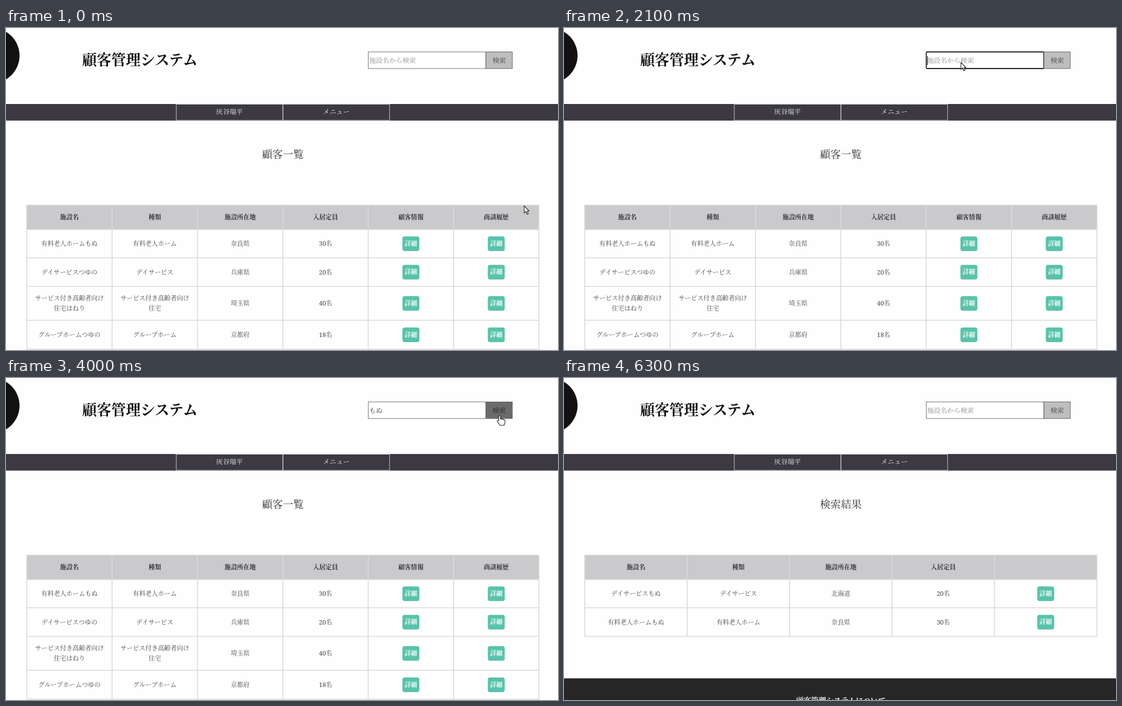
An HTML page for the animation above (6700 ms loop, 979 by 572 pixels).

```html
<!DOCTYPE html>
<html lang="ja">
<head>
<meta charset="utf-8">
<title>顧客管理システム</title>
<style>
  html, body { margin: 0; width: 100%; height: 100%; overflow: hidden; background: #fefefe; }
  svg { display: block; }
  text { font-family: "Noto Serif", "Noto Serif CJK JP", "Noto Serif JP", "Noto Sans CJK JP", serif; }
  .ui { font-family: "Noto Sans CJK JP", "Noto Sans", sans-serif; font-feature-settings: "palt"; }
</style>
</head>
<body>
<svg id="stage" width="979" height="572" viewBox="0 0 979 572"></svg>
<script>
const LOOP = 6700, STEP = 100;
const stage = document.getElementById('stage');
const INK = '#444', LINE = '#dadadc', GREEN = '#58c3aa';

function add(parent, tag, attrs = {}, content) {
  const el = document.createElementNS('http://www.w3.org/2000/svg', tag);
  for (const key in attrs) el.setAttribute(key, attrs[key]);
  if (content !== undefined) el.textContent = content;
  parent.append(el);
  return el;
}
const group = (parent = stage) => add(parent, 'g');
const box = (parent, x, y, width, height, fill, more) =>
  add(parent, 'rect', { x, y, width, height, fill, ...more });
const path = (parent, d, fill, more) => add(parent, 'path', { d, fill, ...more });

// Text placed by the vertical centre of its ideographs.
function label(parent, content, x, cy, size, fill = INK, more = {}) {
  return add(parent, 'text', {
    x, y: cy + size * 0.38, 'font-size': size, fill, 'text-anchor': 'middle', ...more
  }, content);
}
const left = { 'text-anchor': 'start' };
const bold = { 'font-weight': 600 };

function table(parent, ys, heads, rows) {
  const x0 = 36.8, x1 = 945.2, width = (x1 - x0) / heads.length;
  const bottom = ys[ys.length - 1];
  const mid = i => x0 + width * (i + 0.5);
  box(parent, x0, ys[0], x1 - x0, ys[1] - ys[0], '#cacacc');
  let grid = ys.map(y => `M${x0} ${y}H${x1}`).join('');
  for (let i = 0; i <= heads.length; i++) grid += `M${x0 + width * i} ${ys[0]}V${bottom}`;
  path(parent, grid, 'none', { stroke: LINE, 'stroke-width': 1.6, 'stroke-linecap': 'square' });
  heads.forEach((h, i) => label(parent, h, mid(i), 336, 11.1, '#2c2c2e', bold));
  rows.forEach((row, r) => {
    const cy = (ys[r + 1] + ys[r + 2]) / 2;
    row.forEach((cell, i) => {
      if (cell === DETAIL) {
        box(parent, mid(i) - 15, cy - 13, 30, 26, GREEN, { rx: 4 });
        label(parent, cell, mid(i), cy - 0.5, 11.1, '#fff', bold);
        return;
      }
      const lines = cell.split('|');
      lines.forEach((s, n) =>
        label(parent, s, mid(i), cy - 0.3 + (n - (lines.length - 1) / 2) * 17.5, 11.1));
    });
  });
}

// Page frame
const DETAIL = '詳細', WORD = 'もぬ';
add(stage, 'circle', { cx: -25, cy: 49, r: 49, fill: '#111' });
label(stage, '顧客管理システム', 135, 56, 25.9, '#111', { ...left, ...bold });
box(stage, 0, 135, 979, 29.5, '#3c3943');
[['灰谷瑞平', 302], ['メニュー', 491.3]].forEach(([s, x]) => {
  box(stage, x, 135.5, 189, 28.5, 'none', { stroke: '#c4c3c8' });
  label(stage, s, x + 94.5, 148.5, 11.86, '#f6f6f6');
});

// Customer list
const listPage = group();
label(listPage, '顧客一覧', 491, 224, 18.5, '#333');
table(listPage, [314.7, 358, 408.3, 459, 519.3, 570.6, 640],
  ['施設名', '種類', '施設所在地', '入居定員', '顧客情報', '商談履歴'],
  [
    ['有料老人ホーム' + WORD, '有料老人ホーム', '奈良県', '30名'],
    ['デイサービスつゆの', 'デイサービス', '兵庫県', '20名'],
    ['サービス付き高齢者向け|住宅はねり', 'サービス付き高齢者向け|住宅', '埼玉県', '40名'],
    ['グループホームつゆの', 'グループホーム', '京都府', '18名']
  ].map(row => [...row, DETAIL, DETAIL]));

// Search result
const resultPage = group();
label(resultPage, '検索結果', 491, 224, 18.5, '#333');
table(resultPage, [314.7, 358, 408.3, 459],
  ['施設名', '種類', '施設所在地', '入居定員', ''],
  [
    ['デイサービス' + WORD, 'デイサービス', '北海道', '20名', DETAIL],
    ['有料老人ホーム' + WORD, '有料老人ホーム', '奈良県', '30名', DETAIL]
  ]);
box(resultPage, 0, 533.5, 979, 40, '#262626');
label(resultPage, '顧客管理システムについて', 491, 573, 13.4, '#fff', bold);

// Search field
const field = box(stage, 642.5, 42.5, 208.5, 29.5, '#fff');
const hint = label(stage, '施設名から検索', 644, 57, 11.86, '#8c8c8c', left);
const typed = label(stage, '', 644, 57, 11.86, INK, left);
const underline = box(stage, 645, 65, 10, 1, '#777');
const caret = box(stage, 655, 50, 1, 16, '#222');
const button = box(stage, 851.2, 42.5, 46.8, 29.5, '#bebebe', { stroke: '#666' });
const buttonText = label(stage, '検索', 874.8, 57, 11.86, '#444');

// Suggestion balloon
const balloon = group();
balloon.style.filter = 'drop-shadow(0 1px 2px #0006)';
box(balloon, 717, 79, 116.5, 32.5, '#14191b', { rx: 4 });
path(balloon, 'M727 79.5L733 74L739 79.5Z', '#14191b');
label(balloon, WORD, 726, 95.5, 9, '#eee', { ...left, class: 'ui' });

// Input candidates
function candidates(words) {
  const g = group(), h = 25 + words.length * 24, end = 66.5 + h;
  g.style.filter = 'drop-shadow(0 2px 3px #0007)';
  box(g, 627, 66.5, 171, h, '#2c2c2e', { rx: 5 });
  box(g, 627, end - 22, 171, 1, '#252527');
  words.forEach((w, i) => {
    const y = 81.5 + i * 24;
    label(g, i + 1, 642, y, 10, '#909092', { class: 'ui' });
    label(g, w, 651, y, 11.2, '#f4f4f4', { ...left, class: 'ui' });
  });
  const y = end - 11.5;
  path(g, `M636 ${y + 3}h7l-3.5-6zM654 ${y - 3}h7l-3.5 6z`, '#f0f0f0');
  box(g, 781, y - 4.5, 9.5, 9.5, 'none', { rx: 2, stroke: '#eee', 'stroke-width': 1.2 });
  path(g, `M788 ${y + 2}l-3.6-3.6c-1.6-2.6 2-5 3.6-2.4c1.6-2.6 5.2-.2 3.6 2.4z`, '#fff');
  if (words.length > 3)
    for (let i = 0; i < 5; i++)
      add(g, 'circle', { cx: 789, cy: 110 + i * 9, r: i ? 1.4 : 2.5, fill: '#a5a5a7' });
  return g;
}
const marks = candidates(['、', '､', '，']);
const words = candidates([WORD, '目標達成', '元々興味', '申し訳ない', '申し訳ございません']);

// Pointers, with the hot spot at the origin
const pointer = group();
const shapes = {
  arrow: path(pointer, 'M0 0V12.5L3 9.8L5 15L7.2 14L5.2 9.2H8.8Z', '#fff',
    { stroke: '#222', 'stroke-width': 1.1, 'stroke-linejoin': 'round' }),
  beam: path(pointer, 'M-2.5-4.5H2.5M-2.5 5H2.5M0-4.5V5', 'none', { stroke: '#333' }),
  hand: path(pointer,
    'M-2 9V1.2C-2-.8 1-.8 1 1.2V6C2 5 3.6 5.2 4 6.6C5 5.8 6.5 6.3 6.7 7.6' +
    'C7.6 7 9 7.6 9 9V12C9 14 7.5 15 7.5 17H0C0 15-4.8 11.5-4.8 10C-4.8 8.2-3 8-2 9Z', '#fff',
    { stroke: '#222', 'stroke-width': 1.1, 'stroke-linejoin': 'round' })
};

// [ms, value]: each value holds until the next
const steps = {
  page: [[0, 'list'], [4200, 'result']],
  focus: [[0, false], [600, true], [4000, false]],
  text: [[0, ''], [1300, '、'], [2000, ''], [2400, 'ｍ'.replace('ｍ', 'ｍ')], [2500, 'も'],
    [2600, 'もｎ'], [2700, WORD], [4200, '']],
  composing: [[0, false], [1300, true], [2000, false], [2400, true], [3400, false]],
  balloon: [[0, false], [800, true], [1600, false], [2400, true], [3400, false]],
  popup: [[0, ''], [1500, 'marks'], [2000, ''], [2500, 'words'], [3400, '']],
  hover: [[0, false], [3800, true], [4200, false]],
  shape: [[0, 'arrow'], [500, 'beam'], [2000, 'arrow'], [3800, 'hand'], [4700, 'arrow'], [6300, '']]
};
// [ms, x, y]
const route = [
  [0, 919, 316], [300, 800, 150], [500, 709, 66], [1900, 709, 66], [2000, 704, 61],
  [3400, 704, 61], [3900, 876, 67], [4600, 876, 67], [5000, 301, 448], [5400, 301, 448],
  [5600, 290, 400], [6100, 415, 36], [6200, 477, 2], [LOOP, 477, 2]
];

const at = (list, t) => list.reduce((v, [ms, next]) => (t >= ms ? next : v), list[0][1]);
const show = (el, on) => el.setAttribute('visibility', on ? 'visible' : 'hidden');
const set = (el, attrs) => { for (const k in attrs) el.setAttribute(k, attrs[k]); };

function place(t) {
  const i = route.findIndex(p => p[0] > t);
  const [t0, x0, y0] = route[i - 1], [t1, x1, y1] = route[i];
  const k = (t - t0) / (t1 - t0);
  return [x0 + (x1 - x0) * k, y0 + (y1 - y0) * k];
}

function draw(t) {
  const s = {};
  for (const key in steps) s[key] = at(steps[key], t);
  show(listPage, s.page === 'list');
  show(resultPage, s.page === 'result');
  set(field, s.focus ? { stroke: '#222', 'stroke-width': 1.8, rx: 1.5 }
                     : { stroke: '#777', 'stroke-width': 1, rx: 0 });
  show(hint, !s.text);
  typed.textContent = s.text;
  const end = 644 + s.text.length * 11.86;
  show(underline, s.composing);
  set(underline, { width: Math.max(0, end - 646) });
  show(caret, s.focus);
  set(caret, { x: Math.round(end - 0.5) });
  set(button, { fill: s.hover ? '#6b6b6b' : '#bebebe' });
  set(buttonText, { fill: s.hover ? '#262626' : '#444' });
  show(balloon, s.balloon);
  show(marks, s.popup === 'marks');
  show(words, s.popup === 'words');
  for (const name in shapes) show(shapes[name], name === s.shape);
  set(pointer, { transform: `translate(${place(t)})` });
}

function tick() {
  draw(Math.floor((performance.now() % LOOP) / STEP) * STEP);
  requestAnimationFrame(tick);
}
tick();
</script>
</body>
</html>
```
